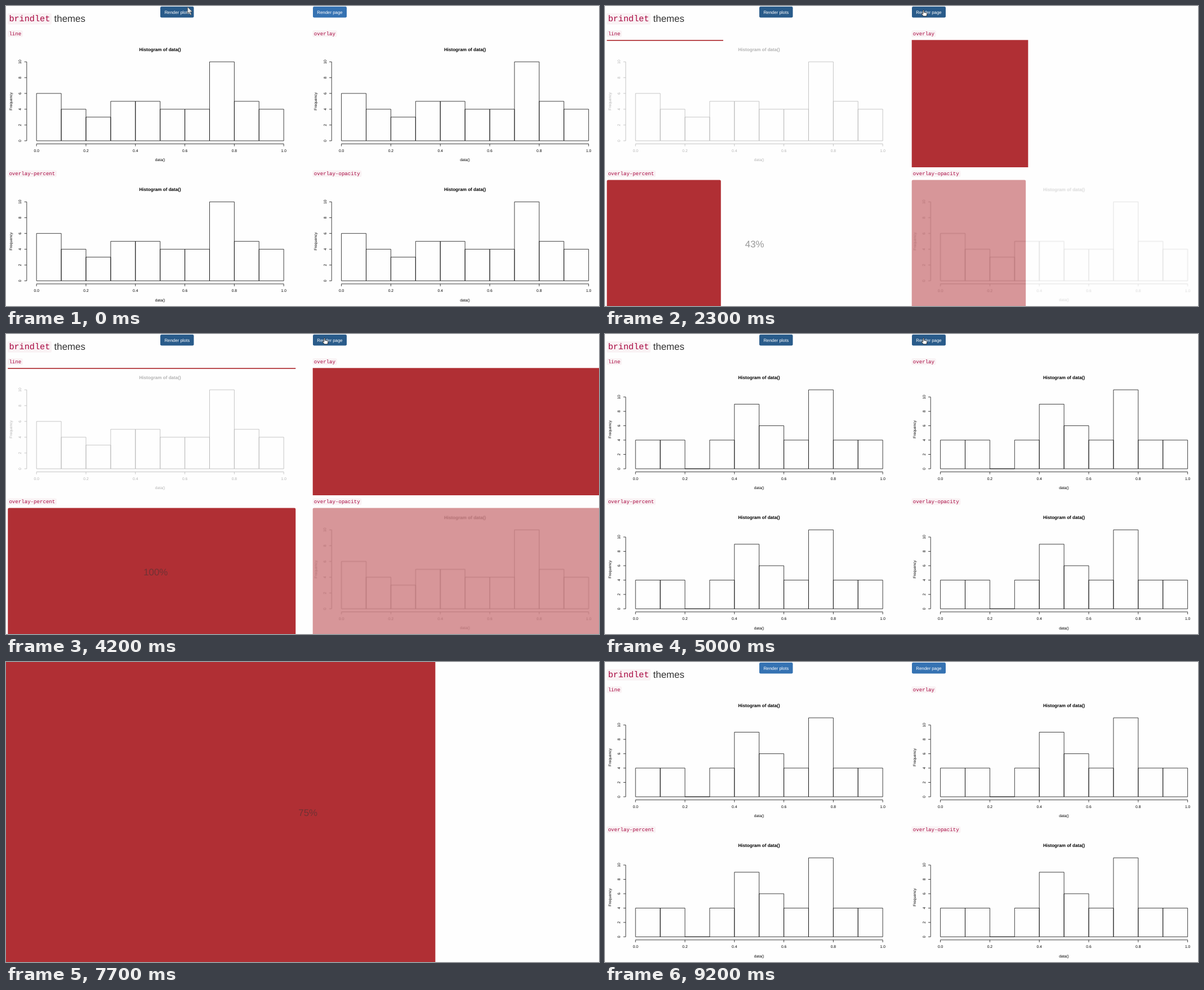
An HTML page for the animation above (9400 ms loop, 1053 px wide and 532 px high).

```html
<!DOCTYPE html>
<html lang="en">
<head>
<meta charset="utf-8">
<title>Progress themes</title>
<style>
  html, body { margin: 0; width: 100%; height: 100%; overflow: hidden; background: #fefefe; }
  svg { display: block; width: 1053px; height: 532px; }
  text { font-family: "Liberation Sans", Arial, sans-serif; text-rendering: geometricPrecision; }
  .code { font-family: "Liberation Mono", "Courier New", monospace; fill: #a8063f; }
  .mid { text-anchor: middle; }
  .axis { font-size: 6.75px; text-anchor: middle; }
  .title { font-size: 8.1px; font-weight: bold; text-anchor: middle; }
  .lines { fill: none; stroke: #000; stroke-width: .75; }
  .btn { font-size: 7.88px; fill: #fff; text-anchor: middle; }
  .pct { font-size: 16.875px; fill: #333; fill-opacity: .5; text-anchor: middle; }
</style>
</head>
<body>
<svg id="stage" viewBox="0 0 1053 532"></svg>
<script>
const LOOP = 9400, TICK = 100;
const RED = '#b02f34', PAPER = '#fefefe', BLUE = '#3572b2', NAVY = '#295b8a';
const COL = 541.4, ROW = 248.3, PANEL = 511;
const before = [6, 4, 3, 5, 5, 4, 4, 10, 5, 4];
const after = [4, 4, 0, 4, 9, 6, 4, 11, 4, 4];

// Tracks are [time, value] pairs, joined by straight lines
const barTrack = [[1050, 0], [1500, 14.7], [1700, 19.2], [2700, 54.6], [3200, 71.6], [3700, 89.2], [4030, 100]];
const countTrack = [[984, 0], [1500, 17], [3200, 73], [4020, 100]];
const panelFade = [[700, 0], [1000, 1], [4300, 1], [4500, 0]];
const plotFade = [[1300, 1], [1400, .68], [1500, .37], [1600, .3]];
const pageBar = [[5520, 0], [6200, 22], [6500, 31.1], [7500, 65.4], [7700, 72.4], [8500, 98.3], [8600, 100]];
const pageCount = [[5405, 0], [6200, 26], [7700, 75], [8465, 100]];
const pageFade = [[5100, 0], [5400, 1], [8800, 1], [9000, .08], [9200, 0]];
const handX = [[900, 322], [1500, 540], [1700, 562], [1800, 567]];
const handY = [[900, 11], [1500, 5.5], [1700, 10], [1800, 13]];

const stage = document.getElementById('stage');

function add(parent, tag, attrs = {}, content) {
  const el = document.createElementNS('http://www.w3.org/2000/svg', tag);
  set(el, attrs);
  if (content !== undefined) el.textContent = content;
  parent.append(el);
  return el;
}

function set(el, attrs) {
  for (const key in attrs) el.setAttribute(key, attrs[key]);
}

function at(track, t) {
  if (t <= track[0][0]) return track[0][1];
  for (let i = 1; i < track.length; i++) {
    const [t0, a] = track[i - 1], [t1, b] = track[i];
    if (t < t1) return a + (b - a) * (t - t0) / (t1 - t0);
  }
  return track[track.length - 1][1];
}

function chip(x, y, size, label) {
  const h = size * 1.31;
  add(stage, 'rect', { x, y: y - h / 2, width: label.length * size * .6 + 5, height: h, rx: 2.25, fill: '#f9f2f4' });
  add(stage, 'text', { class: 'code', x: x + 2.4, y: y + size * .3, 'font-size': size }, label);
}

function button(x, width, label) {
  const box = add(stage, 'rect', { x, y: 1, width, height: 19.5, rx: 2.25 });
  add(stage, 'text', { class: 'btn', x: x + width / 2, y: 13.6 }, label);
  return box;
}

function histogram(parent, counts) {
  const g = add(parent, 'g');
  const left = 54.2, base = 239, step = 43.9, unit = 140 / Math.max(...counts);
  let path = `M${left} 244.5h${step * 10}M36.8 ${base}v${-unit * 10}`;
  counts.forEach((n, i) => {
    path += `M${left + i * step} ${base}v${-n * unit}h${step}v${n * unit}z`;
  });
  for (let i = 0; i <= 5; i++) {
    const x = left + i * step * 2, y = base - i * 2 * unit;
    path += `M${x} 244.5v4.2M36.8 ${y}h-4.2`;
    add(g, 'text', { class: 'axis', x, y: 259 }, (i / 5).toFixed(1));
    add(g, 'text', { class: 'axis', transform: `translate(27.2 ${y}) rotate(-90)` }, i * 2);
  }
  add(g, 'path', { class: 'lines', d: path });
  add(g, 'text', { class: 'axis', x: 273.6, y: 275.4 }, 'data()');
  add(g, 'text', { class: 'axis', transform: 'translate(10.8 169) rotate(-90)' }, 'Frequency');
  add(g, 'text', { class: 'title', x: 273.6, y: 80.2 }, 'Histogram of data()');
  return g;
}

function panel(x, y, height, rx, cover) {
  const g = add(stage, 'g');
  if (cover) add(g, 'rect', { x, y, width: PANEL, height, fill: PAPER });
  const bar = add(g, 'rect', { x, y, width: 0, height, rx, fill: RED });
  return { g, bar };
}

chip(3, 22.8, 15.19, 'brindlet');
add(stage, 'text', { x: 85.6, y: 27.6, 'font-size': 16.875, fill: '#333' }, 'themes');
chip(3, 49.1, 9.11, 'line');
chip(3 + COL, 49.1, 9.11, 'overlay');
chip(3, 49.1 + ROW, 9.11, 'overlay-percent');
chip(3 + COL, 49.1 + ROW, 9.11, 'overlay-opacity');
const plotsBtn = button(274, 59.5, 'Render plots');
const pageBtn = button(545, 60, 'Render page');

const plots = [];
for (const y of [0, ROW]) {
  for (const x of [0, COL]) {
    const g = add(stage, 'g', { transform: `translate(${x} ${y})` });
    plots.push({ g, old: histogram(g, before), fresh: histogram(g, after) });
  }
}

const panels = [
  { ...panel(3.3, 60.2, 1.7, 0, false), lag: 0, alpha: 1 },
  { ...panel(3.3 + COL, 60.3, 225.7, 0, true), lag: 0, alpha: 1 },
  { ...panel(3.3, 308.6, 226, 2.25, true), lag: 23, alpha: 1 },
  { ...panel(3.3 + COL, 308.6, 226, 2.25, true), lag: 23, alpha: .5 }
];
const count = add(panels[2].g, 'text', { class: 'pct', x: 265.7, y: 428 });

const page = add(stage, 'g');
add(page, 'rect', { width: 1053, height: 532, fill: PAPER });
const wide = add(page, 'rect', { height: 532, fill: RED });
const total = add(page, 'text', { class: 'pct', x: 536.2, y: 273.2 });

const arrow = add(stage, 'path', {
  d: 'M322.3 1.5v12l2.8-2.4 2.2 4.8 2-.9-2.1-4.7h3.7z',
  fill: '#e4e4e4', stroke: '#333', 'stroke-width': .7
});
const hand = add(stage, 'path', {
  d: 'M-2.4-4.8c0-1.4 1.8-1.4 1.8 0v3l4.2.8c1.2.3 1.5.9 1.3 2l-.8 4H-1.6L-4.5 1.6c-.8-1.2.5-2 1.3-1.1l.8.8z',
  fill: '#fff', stroke: '#222', 'stroke-width': .9, 'stroke-linejoin': 'round'
});

function show(el, on) {
  el.style.display = on ? '' : 'none';
}

function draw(t) {
  const fresh = t >= 5000;
  for (const p of plots) {
    show(p.old, !fresh);
    show(p.fresh, fresh);
    p.g.setAttribute('opacity', fresh ? 1 : at(plotFade, t));
  }

  const fade = at(panelFade, t);
  for (const p of panels) {
    show(p.g, fade > 0);
    p.g.setAttribute('opacity', fade * p.alpha);
    p.bar.setAttribute('width', at(barTrack, t - p.lag) / 100 * PANEL);
  }
  count.textContent = Math.round(at(countTrack, t)) + '%';

  const cover = at(pageFade, t);
  show(page, cover > 0);
  page.setAttribute('opacity', cover);
  wide.setAttribute('width', at(pageBar, t) / 100 * 1053);
  total.textContent = Math.round(at(pageCount, t)) + '%';

  plotsBtn.setAttribute('fill', t < 8900 ? NAVY : BLUE);
  pageBtn.setAttribute('fill', t >= 1500 && t < 8900 ? NAVY : BLUE);

  show(arrow, t < 500);
  show(hand, t >= 500 && t < 5600);
  hand.setAttribute('transform', `translate(${at(handX, t)} ${at(handY, t)})`);
}

const start = performance.now();
function frame() {
  const t = (performance.now() - start) % LOOP;
  draw(Math.floor(t / TICK) * TICK);
  requestAnimationFrame(frame);
}
draw(0);
requestAnimationFrame(frame);
</script>
</body>
</html>
```
